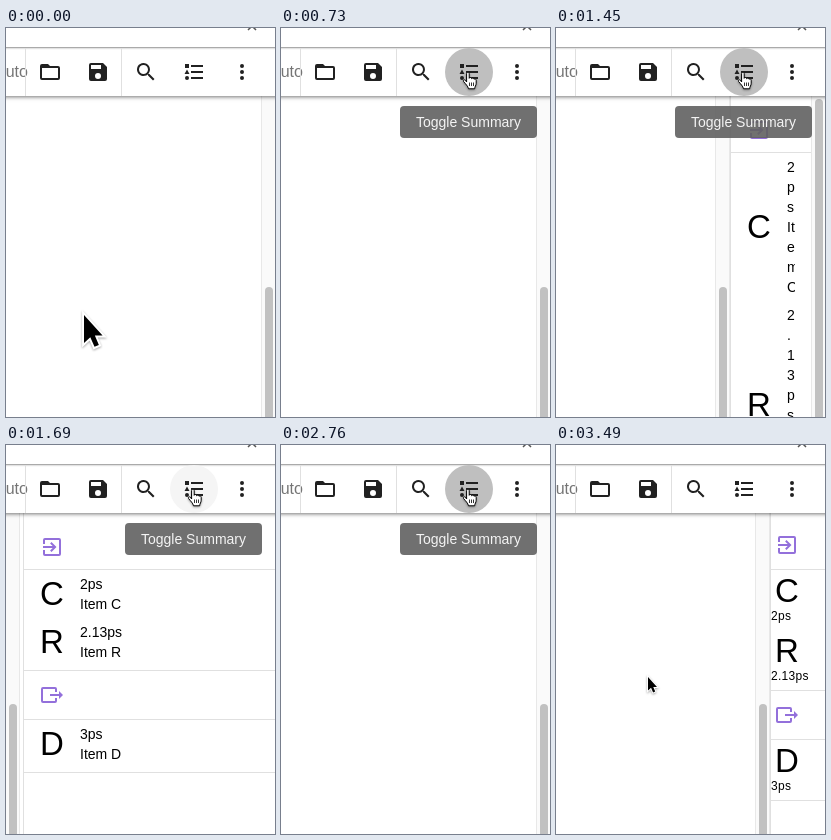
An HTML page for the animation above (3570 ms loop, 269 by 389 pixels).

```html
<!DOCTYPE html>
<html lang="en">
<head>
<meta charset="utf-8">
<title>Toggle Summary</title>
<style>
html, body { margin: 0; width: 100%; height: 100%; overflow: hidden; background: #fff; }
body { position: relative; font-family: "Liberation Sans", Arial, sans-serif; }
div, svg { position: absolute; box-sizing: border-box; }
svg { overflow: visible; }
#header { left: -10px; right: -10px; top: -10px; height: 29px; background: #fff; box-shadow: 0 1px 2px rgba(0,0,0,.35); }
#toolbar { left: -10px; right: -10px; top: 20px; height: 48px; background: #fff; box-shadow: 0 1px 4px rgba(0,0,0,.55); }
#auto { left: -11px; top: 35px; font-size: 16px; line-height: 18px; color: #757575; }
.sep { top: 20px; width: 1px; height: 48px; background: #e0e0e0; }
#hover { left: 164px; top: 20px; width: 48px; height: 48px; border-radius: 50%; }
.track { top: 68px; bottom: 0; width: 15px; background: #fafafa; border: solid #e8e8e8; border-width: 0 1px; }
.thumb { left: 3px; width: 8px; height: 400px; border-radius: 4px; background: #c1c1c1; }
#panel { top: 68px; right: 0; bottom: 0; background: #fff; border-left: 1px solid #e0e0e0; overflow: hidden; }
#narrow, #wide { left: 0; top: 0; width: 100%; height: 100%; }
#narrow .line { left: 0; right: 0; height: 1px; background: #e0e0e0; }
.big { font-size: 33px; line-height: 36px; }
#narrow .big { left: 4px; }
.small { left: 0; font-size: 12px; line-height: 14px; letter-spacing: .3px; white-space: nowrap; }
#wide .row { position: relative; display: flex; align-items: center; padding: 4px 16px; }
#wide .icon { position: relative; height: 57px; border-bottom: 1px solid #e0e0e0; }
#wide .big { position: relative; flex: none; width: 24px; margin-right: 16px; line-height: 40px; }
#wide .text { position: relative; flex: 1; min-width: 0; overflow: hidden; overflow-wrap: anywhere; font-size: 14px; line-height: 20px; }
#tip { left: 119px; top: 78px; width: 137px; height: 32px; border-radius: 4px; background: rgba(97,97,97,.9); color: #f4f4f4;
  font-size: 14px; line-height: 32px; text-align: center; white-space: nowrap; transform-origin: top; }
#cursor { left: 0; top: 0; width: 1px; height: 1px; }
</style>
</head>
<body>
<div id="track" class="track"><div class="thumb" style="top:191px"></div></div>
<div id="panel">
  <div id="narrow"></div>
  <div id="wide"></div>
  <div id="bar" class="track" style="top:0;right:0;width:14px;border-right:0"><div class="thumb" style="top:3px"></div></div>
</div>
<div id="toolbar"></div>
<div id="header"></div>
<div id="auto">Auto</div>
<div class="sep" style="left:19px"></div>
<div class="sep" style="left:115px"></div>
<div id="hover"></div>
<svg id="icons" width="269" height="68"><path d="M242 2l4-4 4 4" fill="none" stroke="#555" stroke-width="1.5"/></svg>
<div id="tip">Toggle Summary</div>
<svg id="cursor" style="filter:drop-shadow(0 1px 1px rgba(0,0,0,.35))">
  <path id="arrow" d="M0 0V16L3.6 12.7 6 18.2 8.5 17.1 6.2 11.7H10.6Z" stroke="#fff" stroke-width="2.2" paint-order="stroke"/>
  <g id="hand" transform="translate(-5 -1)" fill="#fff" stroke="#000" stroke-linejoin="round">
    <path d="M3.6 10V1.8c0-2 2.6-2 2.6 0V6.3c.3-1.2 2.3-1 2.5.4.5-1 2.2-.7 2.3.6.6-.8 2.2-.5 2.2.9v3c0 2.5-1.5 3.2-1.5 5.6H5.5C5 14.2 2.6 12 .6 9.6c-.9-1.4.8-2.3 1.8-1.4z"/>
    <path d="M6.5 10.5v3.5M8.5 10.5v3.5M10.5 10.5v3.5" stroke-width=".8"/>
  </g>
</svg>
<script>
const $ = id => document.getElementById(id);
const PURPLE = '#9370db';
const enter = 'M10.1 15.6L11.5 17l5-5-5-5-1.4 1.4L12.7 11H3v2h9.7zM19 3H5a2 2 0 0 0-2 2v4h2V5h14v14H5v-4H3v4a2 2 0 0 0 2 2h14a2 2 0 0 0 2-2V5a2 2 0 0 0-2-2z';
const leave = 'M23 12l-4-4v3h-9v2h9v3zM1 18V6a2 2 0 0 1 2-2h12a2 2 0 0 1 2 2v3h-2V6H3v12h12v-3h2v3a2 2 0 0 1-2 2H3a2 2 0 0 1-2-2z';
const tools = [
  'M20 6h-8l-2-2H4a2 2 0 0 0-2 2v12a2 2 0 0 0 2 2h16a2 2 0 0 0 2-2V8a2 2 0 0 0-2-2zm0 12H4V8h16z',
  'M17 3H5a2 2 0 0 0-2 2v14a2 2 0 0 0 2 2h14a2 2 0 0 0 2-2V7zm-5 16a3 3 0 1 1 0-6 3 3 0 0 1 0 6zm3-10H5V5h10z',
  'M15.5 14h-.8l-.3-.3a6.5 6.5 0 1 0-.7.7l.3.3v.8l5 5 1.5-1.5zm-6 0a4.5 4.5 0 1 1 0-9 4.5 4.5 0 0 1 0 9z',
  'M5 9.5L7.5 14h-5zM3 4h4v4H3zM5 20a2 2 0 1 0 0-4 2 2 0 0 0 0 4zM9 5v2h12V5zM9 19h12v-2H9zM9 13h12v-2H9z',
  'M12 8a2 2 0 1 0 0-4 2 2 0 0 0 0 4zm0 2a2 2 0 1 0 0 4 2 2 0 0 0 0-4zm0 6a2 2 0 1 0 0 4 2 2 0 0 0 0-4z'
];
$('icons').innerHTML += tools.map((d, i) =>
  `<path d="${d}" transform="translate(${32 + 48 * i} 32)" fill="#212121" fill-rule="evenodd"/>`).join('');

const icon = (d, x, y) =>
  `<svg width="24" height="24" style="left:${x}px;top:${y}px"><path d="${d}" fill="${PURPLE}" fill-rule="evenodd"/></svg>`;
const line = y => `<div class="line" style="top:${y}px"></div>`;
const cell = (name, time, y) =>
  `<div class="big" style="top:${y + 3}px">${name}</div><div class="small" style="top:${y + 39}px">${time}</div>`;
$('narrow').innerHTML = icon(enter, 4, 20) + line(56) + cell('C', '2ps', 57) + cell('R', '2.13ps', 117) + line(177) +
  icon(leave, 4, 190) + line(226) + cell('D', '3ps', 227) + line(287);

const row = (name, time) =>
  `<div class="row"><div class="big">${name}</div><div class="text">${time}<br>Item ${name}</div></div>`;
const iconRow = d => `<div class="icon">${icon(d, 16, 22)}</div>`;
const rule = '<div style="position:relative;height:5px;border-bottom:1px solid #e0e0e0"></div>';
$('wide').innerHTML = iconRow(enter) + row('C', '2ps') + row('R', '2.13ps') + rule +
  iconRow(leave).replace('top:22px', 'top:12px').replace('class="icon"', 'class="icon" style="height:49px"') + row('D', '3ps') + rule;

const clamp = u => Math.max(0, Math.min(1, u));
const smooth = u => (u = clamp(u), u * u * (3 - 2 * u));
const mix = (a, b, u) => a + (b - a) * u;

// Bursts of movement: start and length in ms, drawn every 80 ms
const bursts = [[0, 560], [730, 400], [1290, 400], [2200, 320], [2760, 320], [3410, 80]];
const LOOP = 3570, CLOSED = 270, SLIM = 214, FULL = 17;

function draw(now) {
  const t = now % LOOP;
  const n = bursts.findLastIndex(b => t >= b[0]);
  const age = Math.min(bursts[n][1], Math.floor((t - bursts[n][0]) / 80) * 80);

  const x = Math.round([
    CLOSED,
    mix(CLOSED, SLIM, smooth(age / 240)),
    mix(SLIM, FULL, smooth((age - 63) / 337)),
    mix(FULL, CLOSED, smooth(age / 320)),
    mix(CLOSED, SLIM, smooth(age / 240)),
    SLIM
  ][n]);
  const wide = n === 2 && age >= 160;
  const gap = n === 2 && age >= 240 || n === 3 && age < 320 ? 3 : 0;
  const bar = wide && age < 240;
  $('panel').style.left = x + 'px';
  $('track').style.left = x - 15 - gap + 'px';
  $('narrow').style.display = wide || n === 3 ? 'none' : '';
  $('wide').style.display = wide ? '' : 'none';
  $('wide').style.width = bar ? 'calc(100% - 14px)' : '100%';
  $('bar').style.display = bar ? '' : 'none';

  // Button: light on hover, dark while the press fades
  const hovered = n === 0 ? age >= 320 : n < 5;
  const press = n > 0 && n < 5 ? (age <= 160 ? 191 : age === 240 ? 208 : age === 320 ? 238 : 245) : 245;
  $('hover').style.background = hovered ? `rgb(${press},${press},${press})` : 'none';

  const tip = n === 0 ? (age < 400 ? 0 : age === 400 ? .8 : 1) : 1;
  $('tip').style.transform = `scale(${tip})`;
  $('tip').style.opacity = n === 5 ? (age ? 0 : .5) : 1;

  let cx = 187, cy = 45, size = .85;
  if (n === 0) {
    const u = smooth(age / 320);
    cx = mix(78, 187, u);
    cy = age > 400 ? (age === 480 ? 50 : 45) : mix(287, 58, u);
    size = mix(1.75, .85, u);
  } else if (n === 5) {
    [cx, cy] = age ? [92, 232] : [140, 132];
  }
  $('cursor').style.transform = `translate(${cx}px,${cy}px)`;
  $('arrow').setAttribute('transform', `scale(${size})`);
  $('arrow').style.display = hovered ? 'none' : '';
  $('hand').style.display = hovered ? '' : 'none';
}

const begin = performance.now();
function frame() {
  draw(performance.now() - begin);
  requestAnimationFrame(frame);
}
frame();
</script>
</body>
</html>
```
